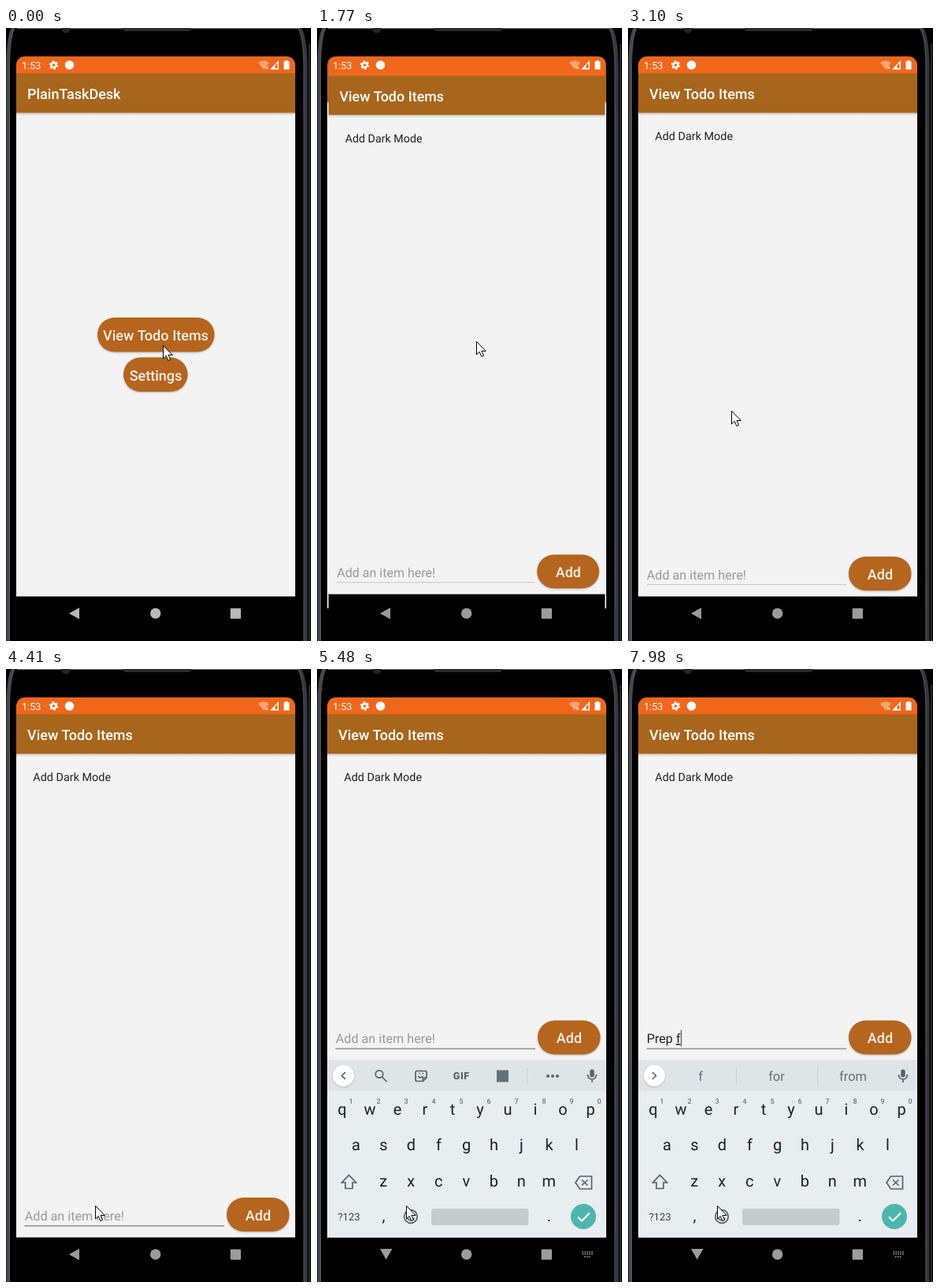
Recreate the animation shown at these times as an HTML page. Size 387 by 777 pixels, loop 8 s.

```html
<!DOCTYPE html>
<html lang="en">
<head>
<meta charset="utf-8">
<title>Todo app demo</title>
<style>
  html, body { margin: 0; width: 100%; height: 100%; overflow: hidden; background: #000; }
  svg { display: block; width: 100%; height: 100%; font-family: Roboto, sans-serif; }
  text { white-space: pre; text-rendering: geometricPrecision; }
  .mid { text-anchor: middle; }
  .title, .btn text { font-size: 18px; font-weight: 500; fill: #fff; word-spacing: .3px; }
  .btn text { text-anchor: middle; fill: #f7efe8; }
  .btn rect { fill: #b5651d; filter: drop-shadow(0 1px 1px #0004); }
  .field { font-size: 16.2px; fill: #222; }
  .sug { font-size: 16.5px; fill: #667177; text-anchor: middle; }
  .key { font-size: 20px; fill: #10252c; text-anchor: middle; }
  .digit { font-size: 9px; font-weight: 500; fill: #6b777d; text-anchor: middle; }
  .line { fill: none; stroke: #54626a; stroke-width: 1.7; }
  .u { text-decoration: underline; }
</style>
</head>
<body>
<svg viewBox="0 0 387 777">
  <defs>
    <clipPath id="screen"><path d="M13 777V47A11 11 0 0 1 24 36H356A11 11 0 0 1 367 47V777Z"/></clipPath>
    <clipPath id="page"><rect x="13" y="36" width="354" height="684.5"/></clipPath>
    <linearGradient id="shade" x2="0" y2="1">
      <stop stop-color="#301000" stop-opacity=".2"/><stop offset="1" stop-color="#301000" stop-opacity="0"/>
    </linearGradient>
    <g id="window">
      <rect x="13" y="720" width="354" height="44"/>
      <rect x="13" y="100" width="354" height="620.5" fill="#f3f3f3"/>
      <rect x="13" y="36" width="354" height="22" fill="#f0671c"/>
      <rect x="13" y="57.5" width="354" height="50" fill="#a8651c"/>
      <rect x="13" y="107.5" width="354" height="3.5" fill="url(#shade)"/>
    </g>
  </defs>

  <!-- phone body -->
  <rect width="387" height="777"/>
  <g fill="none">
    <path d="M10-2Q2.500 9 2.500 48V780" stroke="#45474b" stroke-width="4"/>
    <path d="M12-2Q4.500 10 4.500 48V780" stroke="#5d6064"/>
    <path d="M371-2Q380 10 380 52V780" stroke="#36393b" stroke-width="5"/>
    <path d="M370-2Q378 10 378 52V780M385 20V777" stroke="#505457"/>
    <path d="M14 .5H372" stroke="#77797b"/>
  </g>
  <circle cx="76" cy="1" r="5.500" fill="#232527"/>
  <rect x="148" y="-5" width="87" height="9" rx="4" fill="#2a2b2d"/>

  <g clip-path="url(#screen)">
    <g id="home">
      <use href="#window"/>
      <text class="title" x="27" y="90">PlainTaskDesk</text>
      <g class="btn">
        <rect x="116" y="367" width="148.500" height="43.500" rx="21.700"/>
        <text x="190" y="396">View Todo Items</text>
        <rect x="149" y="417.500" width="81.500" height="43.500" rx="21.700"/>
        <text x="190" y="446.500">Settings</text>
      </g>
    </g>
    <g id="list">
      <use href="#window"/>
      <text class="title" x="27" y="90">View Todo Items</text>
      <text x="34.300" y="142.300" font-size="14.400" fill="#222">Add Dark Mode</text>
      <g id="form">
        <text id="hint" class="field" x="23.700" y="698.500" style="fill:#999">Add an item here!</text>
        <text id="typed" class="field" x="23.700" y="698.500"><tspan id="plain"></tspan><tspan id="open" class="u"></tspan></text>
        <rect id="rule" x="23.500" width="253.500"/>
        <rect id="caret" y="682" width="1.300" height="21" fill="#666"/>
        <g class="btn">
          <rect x="280" y="670" width="79.500" height="43" rx="21.500"/>
          <text x="320" y="698.700">Add</text>
        </g>
      </g>
    </g>
  </g>

  <g clip-path="url(#page)">
    <g id="board">
      <rect x="13" y="495.500" width="354" height="40" fill="#dfe4e7"/>
      <rect x="13" y="535" width="354" height="186" fill="#e8edf0"/>
      <circle cx="33.500" cy="515.500" r="13.500" fill="#fff" style="filter:drop-shadow(0 1px 1px #0003)"/>
      <path id="chevron" class="line" d="M2.500-4.500L-2 0L2.500 4.500"/>

      <g id="tools">
        <g class="line">
          <circle cx="79" cy="513.500" r="4.700"/><path d="M82.500 517L88.500 523"/>
          <path d="M127 509.500H137Q139 509.500 139 511.500V518L134.500 522.500H127Q125 522.500 125 520.500V511.500Q125 509.500 127 509.500ZM139 518H134.500V522.500M128.500 516Q131 520 134 516"/>
          <path d="M129 512.500H130.500M133.500 512.500H135"/>
        </g>
        <text class="mid" x="183.300" y="520.300" font-size="12.500" font-weight="900" letter-spacing=".6" fill="#54626a">GIF</text>
        <rect x="228" y="508.500" width="15" height="15" fill="#64717a"/>
        <path d="M266.500 506V525" stroke="#c9d0d3"/>
        <g fill="#54626a"><circle cx="293" cy="516" r="2"/><circle cx="299" cy="516" r="2"/><circle cx="305" cy="516" r="2"/></g>
      </g>
      <g id="words">
        <path d="M137.500 505V527M240.500 505V527" stroke="#c9d0d3"/>
        <text class="sug" x="92" y="522"></text>
        <text class="sug" x="188.500" y="522"></text>
        <text class="sug" x="285.500" y="522"></text>
      </g>
      <rect x="346.300" y="507.500" width="5.400" height="10" rx="2.700" fill="#54626a"/>
      <path class="line" d="M343.500 514Q344 520 349 520Q354 520 354.500 514M349 520V524"/>

      <g id="keys"></g>
      <path class="line" d="M40.500 641.500L49.500 651H45V658.500H36V651H31.500Z"/>
      <path class="line" d="M333.500 643H348.500V659H333.500L328 651ZM336 647.500L343.500 654.500M343.500 647.500L336 654.500"/>
      <text class="mid" x="40.500" y="699" font-size="13" fill="#33454c">?123</text>
      <text class="key" x="84.500" y="700">,</text>
      <g class="line">
        <circle cx="119" cy="694" r="8.300"/><path d="M114.500 696Q119 702 123.500 696"/>
        <path d="M115 691.500H117M121 691.500H123"/>
      </g>
      <rect x="145" y="684" width="123.500" height="21" rx="3" fill="#c6cbce"/>
      <text class="key" x="294.500" y="700">.</text>
      <circle cx="338" cy="694" r="16" fill="#4db6ac"/>
      <path d="M331 694.500L336 699.500L346 689.500" fill="none" stroke="#fff" stroke-width="2"/>
    </g>
  </g>

  <!-- status bar -->
  <g fill="#fff">
    <text x="20" y="51.700" font-size="12.600">1:53</text>
    <g fill="none" stroke="#fff">
      <circle cx="60.500" cy="47" r="3.100" stroke-width="2.600"/>
      <circle cx="60.500" cy="47" r="4.700" stroke-width="2" stroke-dasharray="2.400 2.522"/>
    </g>
    <circle cx="80.500" cy="47" r="5.800"/>
    <path d="M320 44Q327 38.500 334 44L327 52.500Z" opacity=".4"/>
    <path d="M329 48.500L332.500 52M332.500 48.500L329 52" stroke="#fff"/>
    <path d="M335 52.500L346 41V52.500Z"/>
    <path d="M341.500 47.500L344.500 44.500V51H341.500Z" fill="#f0671c"/>
    <path d="M354.500 41H357.500V42.300H359.500V52.500H352.500V42.300H354.500Z"/>
  </g>

  <!-- navigation bar -->
  <g id="nav">
    <path id="back"/>
    <circle cx="189.700" cy="742" r="6.700"/>
    <rect x="284.700" y="735.500" width="13.300" height="13.300" rx="1"/>
    <path id="swap" d="M336.500 739H350M336.500 741.500H350M339 745H347.500" stroke="#9c9c9c" stroke-width="1.600" stroke-dasharray="1.700 1.200"/>
  </g>
  <path id="mouse" d="M0 0V16.500L3.700 13L6.300 19L9 17.900L6.500 12H11.700Z" fill="#fff" stroke="#000"/>
</svg>

<script>
const $ = id => document.getElementById(id);
const set = (el, attrs) => { for (const k in attrs) el.setAttribute(k, attrs[k]); };
const show = (id, on) => $(id).style.display = on ? "" : "none";
// Latest entry whose start time has been reached
const at = (track, t) => track.filter(step => step[0] <= t).pop();

const LOOP = 8000;
const mouse = [
  [0, 199, 402], [150, 202, 397], [1890, 201, 380], [2010, 193, 338], [2130, 182, 295],
  [2250, 173, 256], [2400, 184, 220], [2680, 137, 175], [2830, 116, 157], [3100, 131, 485],
  [3220, 136, 678], [3340, 122, 677], [3490, 116, 677], [3640, 113, 680]
];
const opening = [[0, 0], [1620, .24], [1770, .94], [1890, .98], [2010, .993], [2130, .998], [2250, 1]];
const caret = [[0, 0], [4040, 1], [4410, 0], [4810, 1], [5480, 0], [5910, 1], [7320, 0], [7470, 1]];
const navTone = [[0, "#b8b8b8"], [150, "#aaa"], [420, "#9c9c9c"]];
// time, committed text, text being composed, suggestions
const typing = [
  [0, "", "", ""],
  [6340, "", "P", "P Please Plan"],
  [6460, "", "Pr", "P Please Plan"],
  [6580, "", "Pr", "Pr Pretty Press"],
  [6700, "", "Pre", "Pre Pretty Press"],
  [6850, "", "Prepr", "Prepr Prepare Prepared"],
  [7470, "", "Prep", "Prepr Prepare Prepared"],
  [7590, "", "Prep", "Prep Prepare Prepared"],
  [7740, "Prep ", "", "Prep Prepare Prepared"],
  [7860, "Prep ", "f", "for the and"],
  [7980, "Prep ", "f", "f for from"]
];

function addText(cls, x, y, str) {
  const el = document.createElementNS("http://www.w3.org/2000/svg", "text");
  set(el, { class: cls, x, y });
  el.textContent = str;
  $("keys").append(el);
}
[["qwertyuiop", 32, 565], ["asdfghjkl", 49.5, 610], ["zxcvbnm", 84.3, 656]].forEach(([row, x, y], r) =>
  [...row].forEach((ch, i) => {
    addText("key", x + 35 * i, y, ch);
    if (!r) addText("digit", x + 11 + 35 * i, y - 14, (i + 1) % 10);
  }));

const zoom = s => `translate(190 400) scale(${s}) translate(-190 -400)`;

function draw(t) {
  const [, x, y] = at(mouse, t);
  set($("mouse"), { transform: `translate(${x + .5} ${y + .5})` });

  const p = at(opening, t)[1];
  show("home", p < 1);
  show("list", p > 0);
  set($("home"), { transform: zoom(1 + .05 * p) });
  set($("list"), { transform: zoom(.85 + .15 * p), opacity: p < .5 ? .1 : 1 });

  const focused = t >= 4040, keyboard = t >= 4810;
  set($("form"), { transform: `translate(0 ${keyboard ? -224.5 : 0})` });
  set($("rule"), focused ? { y: 705, height: 1.7, fill: "#999" } : { y: 705, height: 1, fill: "#c6c6c6" });

  const [, plain, open, words] = at(typing, t);
  $("plain").textContent = plain;
  $("open").textContent = open;
  show("hint", !plain && !open);
  show("caret", at(caret, t)[1]);
  set($("caret"), { x: 24 + (plain || open ? $("typed").getComputedTextLength() : 0) });

  show("board", keyboard);
  set($("board"), { transform: `translate(0 ${t < 4930 ? 60 : 0})` });
  const tools = t >= 5230 && !words;
  show("tools", tools);
  show("words", words);
  set($("chevron"), { transform: `translate(33.5 515.5) scale(${tools ? 1 : -1} 1)` });
  const list = words.split(" ");
  document.querySelectorAll(".sug").forEach((el, i) => el.textContent = list[i] || "");

  set($("nav"), { fill: at(navTone, t)[1] });
  set($("back"), { d: keyboard ? "M80 735H95.5L87.7 748.5Z" : "M80 742L93 734.7V749.3Z" });
  show("swap", keyboard);
}

function tick() {
  draw(performance.now() % LOOP);
  requestAnimationFrame(tick);
}
tick();
</script>
</body>
</html>
```
